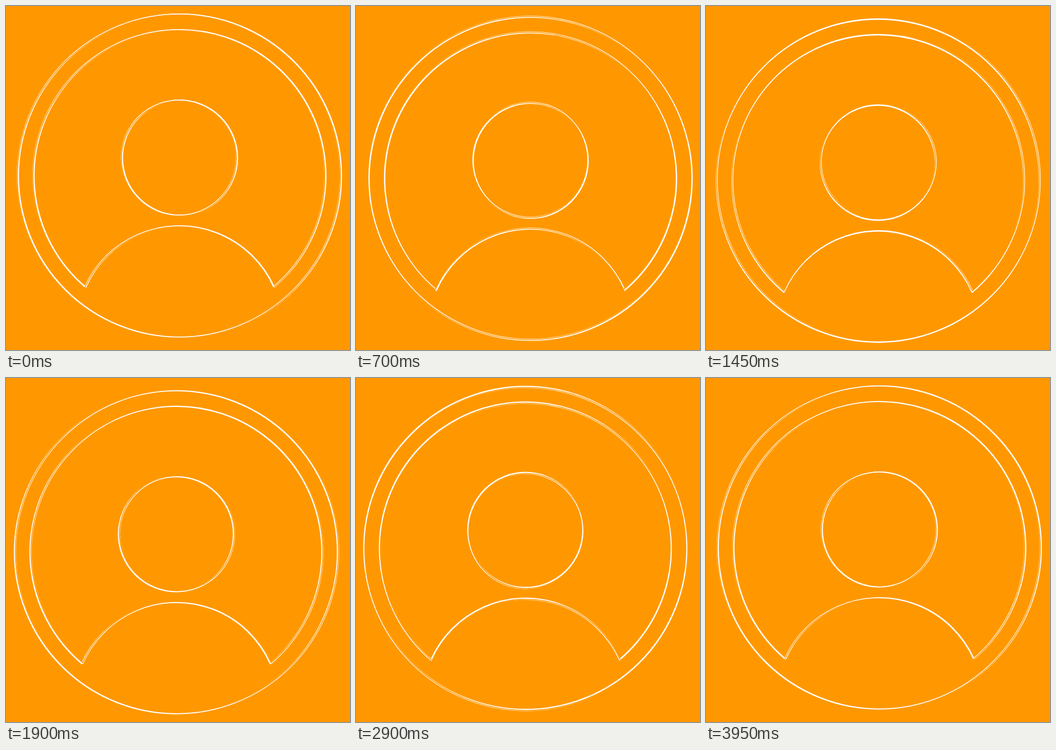
These frames come from a looping animation (640x640 px, 4000 ms). An HTML page with a canvas:

```html
<!DOCTYPE html>
<html lang="en">
<head>
<meta charset="utf-8">
<title>Orbiting account outline</title>
<style>
  html, body { margin: 0; height: 100%; overflow: hidden; background: #ff9800; }
  canvas { display: block; }
</style>
</head>
<body>
<canvas id="stage" width="640" height="640"></canvas>
<script>
const ctx = document.getElementById('stage').getContext('2d');
const LOOP = 4000, STEP = 50, TAU = Math.PI * 2, CENTER = 319.6;
const ORANGE = '#ff9800', WHITE = '#fff';
const polar = (r, a) => [r * Math.cos(a), r * Math.sin(a)];

// Account badge around the origin: ring, head, inner window with shoulders
function makeBadge() {
  const path = new Path2D();
  const circle = (y, r) => {
    path.moveTo(r, y);
    path.arc(0, y, r, 0, TAU);
    path.closePath();
  };
  circle(0, 300.5);
  circle(-33.5, 107);

  const corner = 0.869, shoulder = 1.152, up = -Math.PI / 2;
  const [x, y] = polar(271.5, corner);
  path.moveTo(-x, y);
  path.arc(0, 0, 271.5, Math.PI - corner, TAU + corner);
  path.arc(0, 285.3, 191.8, up + shoulder, up - shoulder, true);
  path.closePath();
  return path;
}

// Outlines from back to front, all circling the centre together;
// the orange one hides parts of the white ones where they meet
const outlines = [
  { color: WHITE, width: 2.2, radius: 4.2, phase: -60 },
  { color: WHITE, width: 2.4, radius: 5.5, phase: -44 },
  { color: ORANGE, width: 1.6, radius: 3.2, phase: -50 },
];
const badge = makeBadge();

function draw(time) {
  const turn = Math.floor(time % LOOP / STEP) * STEP / LOOP * TAU;
  ctx.fillStyle = ORANGE;
  ctx.fillRect(0, 0, 640, 640);
  for (const { color, width, radius, phase } of outlines) {
    const [x, y] = polar(radius, turn + phase / 360 * TAU);
    ctx.setTransform(1, 0, 0, 1, CENTER + x, CENTER + y);
    ctx.strokeStyle = color;
    ctx.lineWidth = width;
    ctx.stroke(badge);
  }
  ctx.resetTransform();
}

const start = performance.now();
function tick() {
  draw(performance.now() - start);
  requestAnimationFrame(tick);
}
tick();
</script>
</body>
</html>
```
